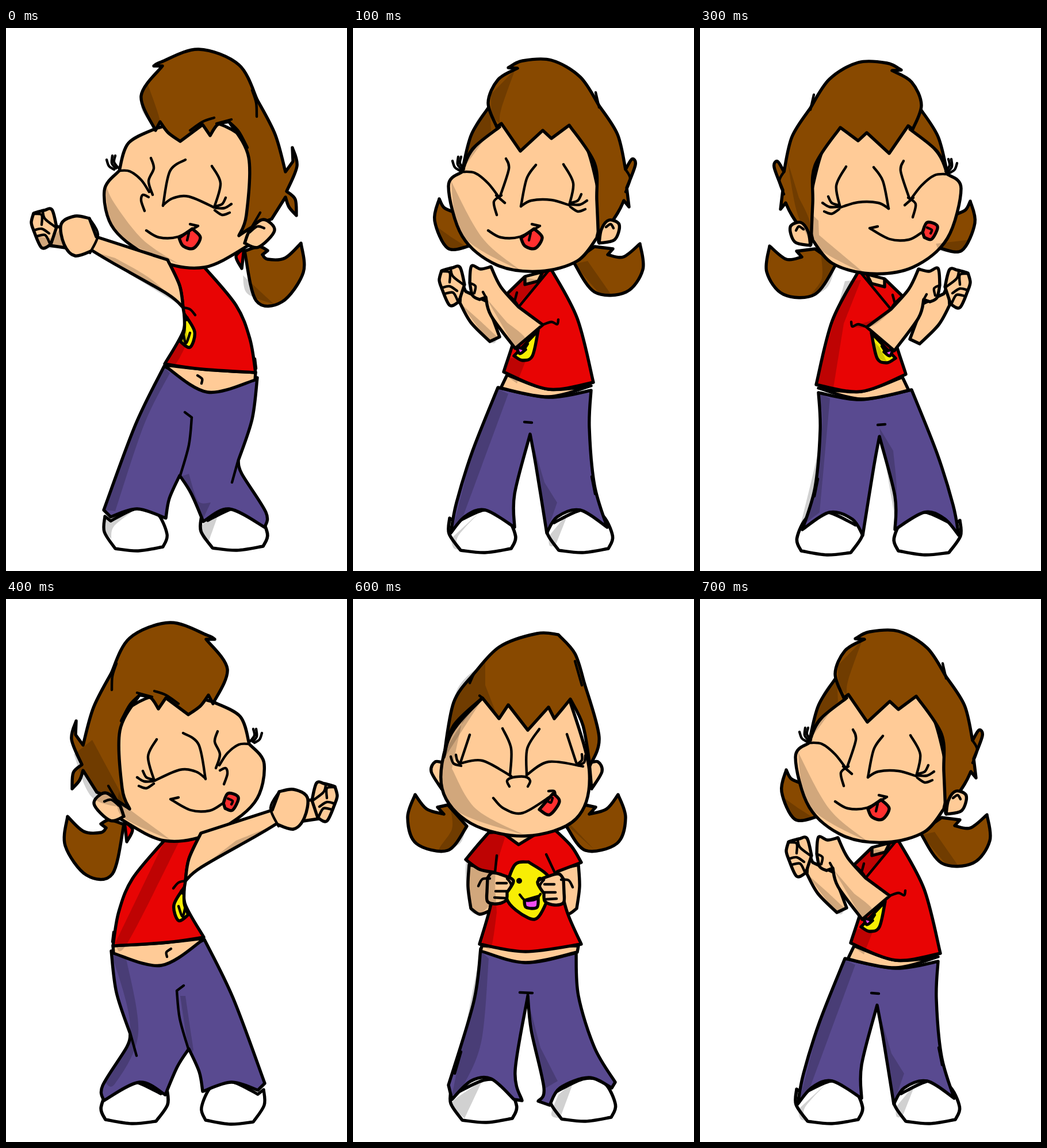
These frames come from a looping animation (593x944 px, 800 ms). An HTML page:

```html
<!DOCTYPE html>
<html lang="en">
<head>
<meta charset="utf-8">
<title>Dancing girl</title>
<style>
html, body { margin: 0; width: 100%; height: 100%; overflow: hidden; background: #fff; }
svg { display: block; width: 100vw; height: 100vh; }
path { stroke: #000; stroke-linecap: round; stroke-linejoin: round; }
</style>
</head>
<body>
<svg id="stage" viewBox="0 0 593 944"></svg>
<script>
const SKIN = '#ffcb97', HAIR = '#884900', RED = '#e80404', PANTS = '#594a90',
      SHOE = '#fff', YELLOW = '#f8ee04', PINK = '#f04ef0', TONGUE = '#ff2f2f';
const BEAT = 100, MIRROR = 620;
const stage = document.getElementById('stage');

function add(parent, tag, attrs) {
  const node = document.createElementNS('http://www.w3.org/2000/svg', tag);
  for (const key in attrs) node.setAttribute(key, attrs[key]);
  return parent.appendChild(node);
}

// Smooth curve through each run of points; a slash marks a sharp corner.
function curve(text) {
  let d = '', last;
  for (const run of text.split('/')) {
    const n = run.trim().split(/\s+/).map(Number);
    const p = last ? [last] : [];
    for (let i = 0; i < n.length; i += 2) p.push([n[i], n[i + 1]]);
    if (!last) d = 'M' + p[0];
    for (let i = 1; i < p.length; i++) {
      const a = p[i - 1], b = p[i], before = p[i - 2] || a, after = p[i + 1] || b;
      const c1 = a.map((v, k) => v + (b[k] - before[k]) / 6);
      const c2 = b.map((v, k) => v - (after[k] - a[k]) / 6);
      d += `C${c1} ${c2} ${b}`;
    }
    last = p[p.length - 1];
  }
  return d;
}

function pen(group) {
  return {
    fill(color, text) {
      add(group, 'path', { d: curve(text) + 'Z', fill: color, 'stroke-width': 5.4 });
    },
    line(...runs) {
      for (const text of runs) add(group, 'path', { d: curve(text), fill: 'none', 'stroke-width': 4.4 });
    },
    dot(x, y) {
      add(group, 'circle', { cx: x, cy: y, r: 5 });
    },
    shade(...runs) {
      for (const text of runs) add(group, 'path', { d: curve(text) + 'Z', 'fill-opacity': 0.18, style: 'stroke:none' });
    },
    at(x, y, sx = 1) {
      return pen(add(group, 'g', { transform: `translate(${x} ${y}) scale(${sx} 1)` }));
    }
  };
}

// Parts shared by several poses
function shoe(p) {
  p.fill(SHOE, '2 14 1 41 20 70 / 60 74 103 67 / 110 45 92 8 58 0 12 22');
}

function fist(p) {
  p.fill(SKIN, '4 36 0 22 4 6 / 22 1 36 0 44 30 / 34 60 / 18 66 4 36');
  p.line('5 7 18 9 18 26', '20 4 24 16 42 30', '4 36 18 33 31 41', '10 46 24 44 32 58');
}

function lashes(p) {
  p.line('2 0 14 -4 20 -15', '3 3 18 3 30 -4', '1 7 14 15 27 11');
}

function farLashes(p) {
  p.line('-3 0 -12 -6 -16 -17', '0 -2 -7 -11 -6 -24', '4 -3 -3 -13 -1 -24');
}

function mouth(p, flipped) {
  p.line('0 0 22 12 55 11 90 -8', '76 -11 89 -8');
  if (flipped) {
    p.fill(TONGUE, '-2 -1 -10 -18 -28 -11 -18 11 -5 8 / -2 -1');
    p.line('-10 -9 -18 -5 -16 1');
  } else {
    p.fill(TONGUE, '80 -3 94 12 82 31 64 27 57 13 / 80 -3');
    p.line('74 4 71 17');
  }
}

function reach(p, flipped) {
  shoe(p.at(170, 835));
  shoe(p.at(338, 834, 1.06));
  p.fill(PANTS, '275 588 225 690 170 838 / 182 850 / 228 836 278 852 / 284 818 302 778 / 322 809 343 858 / 388 836 450 868 / 452 842 410 775 404 752 / 428 680 437 608 / 350 620 275 588');
  p.line('311 668 323 677 / 318 725 303 778', '403 754 393 790');
  p.fill(SKIN, '277 588 350 633 433 612 / 434 599 / 350 594 277 586');
  p.line('333 604 341 610 340 618');
  p.fill(RED, '281 403 302 448 308 486 / 309 525 276 584 / 340 593 434 599 / 424 540 400 482 345 416 / 281 403');
  p.fill(YELLOW, '310 497 328 528 320 555 303 545 / 310 525 310 497');
  p.line('308 530 313 548 320 530', '308 486 320 489 329 499', '433 575 435 592');
  p.dot(313, 505);
  p.fill(RED, '414 383 400 397 410 418');
  p.fill(HAIR, '415 388 440 380 455 387 / 446 394 / 455 402 485 400 513 374 / 517 425 480 476 435 474 415 388');

  p.fill(SKIN, '262 174 213 200 197 248 / 171 283 188 350 260 402 345 416 425 376 / 432 220 350 160 262 174');
  p.fill(HAIR, '257 66 / 270 59 335 37 405 64 437 125 / 468 185 486 250 / 499 232 / 498 208 / 506 240 488 284 / 503 298 505 326 / 492 311 486 294 / 462 332 / 430 345 405 361 / 418 325 422 225 388 163 / 368 168 355 187 / 342 168 / 303 197 / 282 182 268 163 / 260 178 / 235 118 272 66 / 257 66');
  p.fill(SKIN, '415 374 425 350 448 333 467 352 439 381 415 374');
  p.line('424 355 437 345 449 348', '442 321 425 350', '428 108 435 130 436 154', '362 156 342 163 320 178', '388 163 405 180 420 208', '366 166 392 159');
  p.line('197 248 215 249 235 264 249 285', '252 226 257 244 248 266 255 290', '248 294 238 290 235 300 241 318');
  p.line('312 229 285 249 273 309', '273 308 290 296 318 293 362 312', '358 240 373 270 362 312');
  lashes(p.at(362, 310));
  farLashes(p.at(191, 246));
  mouth(p.at(244, 352), flipped);

  p.fill(SKIN, '82 345 98 346 / 103 382 / 76 378');
  fist(p.at(44, 316));
  p.fill(SKIN, '281 403 157 363 / 145 331 / 120 327 96 341 101 376 120 396 150 387 / 185 408 280 462 308 486 / 302 448 281 403');
  p.line('145 331 160 359 146 391');
}

function tuck(p, flipped) {
  shoe(p.at(166, 838, 1.06));
  shoe(p.at(337, 838, 1.04));
  p.fill(PANTS, '252 625 208 735 180 825 170 878 / 195 849 230 838 281 868 / 281 810 308 706 / 318 760 337 878 / 355 850 395 838 442 868 / 420 795 411 695 414 630 / 340 642 252 625');
  p.line('298 685 311 686', '415 780 421 810');
  p.fill(SKIN, '268 603 257 626 / 340 641 414 622 / 340 628 268 603');
  p.fill(RED, '298 433 268 462 / 290 500 262 598 / 340 628 418 616 / 390 505 345 420 / 298 433');
  p.fill(SKIN, '299 432 299 446 / 322 440 / 330 424');
  p.line('340 422 288 485', '285 460 281 475');
  p.fill(YELLOW, '280 570 295 578 312 570 322 526 / 280 570');
  p.fill(PINK, '284 554 290 566 300 559');
  p.line('297 560 304 549');

  p.fill(SKIN, '186 478 205 512 238 545 / 255 537 / 232 475 / 196 458 / 188 440');
  fist(p.at(150, 416));
  p.fill(SKIN, '288 485 257 450 240 415 / 222 419 206 414 203 443 / 208 465 220 472 / 231 468 / 240 500 282 557 / 330 516 / 288 485');
  p.line('231 468 226 459', '205 444 213 449 211 461', '330 516 345 511 355 515 357 507');

  p.fill(HAIR, '150 297 142 335 165 383 205 378 / 175 320 / 158 312 150 297');
  p.fill(HAIR, '420 380 452 384 / 443 394 / 470 398 499 375 / 504 420 475 459 420 459 383 406 / 420 380');
  p.fill(SKIN, '250 165 205 215 190 250 / 166 275 190 362 250 412 325 423 390 405 424 365 / 430 300 380 165 250 165');
  p.fill(HAIR, '238 135 206 185 190 248 / 208 210 255 172');
  p.fill(HAIR, '270 69 / 295 57 345 56 395 85 428 135 / 460 185 474 246 / 485 228 491 238 476 278 / 480 311 / 471 300 / 460 322 427 372 / 424 300 420 235 376 169 / 345 192 / 330 178 / 291 214 / 258 166 / 250 172 / 235 130 252 90 286 70');
  p.fill(SKIN, '428 374 432 350 445 334 463 342 455 368 428 374');
  p.line('440 346 448 341 453 348', '422 112 428 138', '474 246 482 262 474 285');
  p.line('190 250 212 252 235 270 255 296', '266 227 271 245 256 292', '249 291 264 304', '258 291 245 302 250 325');
  p.line('318 238 302 262 292 310', '292 310 310 300 345 299 376 308', '366 237 383 270 376 308');
  lashes(p.at(377, 304));
  farLashes(p.at(189, 248));
  mouth(p.at(235, 352), flipped);
}

function frontSide(p, arm) {
  if (arm) {
    p.fill(SKIN, '202 462 200 500 205 538 / 220 548 238 542 / 248 472');
  } else {
    p.fill(HAIR, '108 340 95 380 110 425 165 437 198 395 / 165 358 / 147 362 / 158 374 / 128 365 108 340');
    p.fill(SKIN, '158 285 143 283 136 300 154 330');
  }
}

function frontFist(p) {
  p.fill(SKIN, '234 485 242 476 260 480 279 490 268 510 / 266 524 250 530 234 526 233 508 / 234 485');
  p.line('250 494 267 494', '248 508 268 508', '246 519 264 520', '218 499 225 487 238 486', '268 486 275 497 268 510');
}

function front(p) {
  shoe(p.at(169, 836, 1.05));
  shoe(p.at(342, 834, 1.04));
  p.fill(PANTS, '222 608 210 700 166 845 / 172 870 / 205 838 240 834 280 870 / 294 872 / 282 820 304 690 / 310 750 332 850 322 873 / 342 880 / 360 850 410 832 450 850 / 456 840 / 420 780 392 690 388 615 / 300 632 222 608');
  p.line('290 684 312 685', '304 686 304 710', '188 787 177 825');
  p.fill(SKIN, '224 603 222 612 / 300 632 390 614 / 392 603');
  frontSide(p, true);
  frontSide(p.at(594, 0, -1), true);
  p.fill(RED, '236 406 215 430 196 453 / 220 470 246 475 / 240 530 220 600 / 300 613 397 600 / 372 543 355 474 / 397 458 / 380 430 352 402 / 236 406');
  p.fill(SKIN, '262 408 / 288 427 / 316 410');
  p.line('250 446 247 475', '336 444 352 478');
  p.fill(YELLOW, '305 457 344 490 326 548 304 554 267 520 280 464 305 457');
  p.dot(289, 490);
  p.dot(325, 488);
  p.fill(PINK, '298 524 301 536 320 536 322 517');
  p.line('290 514 300 524 318 522 326 513');
  frontFist(p);
  frontFist(p.at(600, 2, -1));
  frontSide(p);
  frontSide(p.at(569, 0, -1));

  p.fill(SKIN, '225 172 168 240 155 330 205 390 300 412 388 382 411 300 375 170 / 300 165 225 172');
  p.fill(HAIR, '357 62 / 320 60 255 83 210 130 / 175 180 158 275 / 175 220 225 172 / 254 208 / 270 184 / 304 228 / 340 188 / 350 208 / 365 190 378 174 / 400 220 412 290 / 428 240 402 145 / 386 95 357 62');
  p.line('386 108 398 150', '225 172 220 168', '378 174 381 181', '210 130 203 146');
  p.line('203 236 186 287', '186 286 225 281 275 308', '260 225 275 260 273 307');
  p.line('324 226 303 260 302 306', '302 306 340 283 400 291', '372 235 388 284');
  p.line('188 290 175 286 170 274', '186 287 181 280 179 271', '390 287 398 280 398 270', '392 289 402 284 404 272');
  p.line('272 326 268 316 278 310 299 309 308 316 304 326', '244 346 262 364 295 372 345 342', '340 334 350 334 352 342');
  p.fill(TONGUE, '348 338 359 352 342 375 324 366 / 348 338');
  p.line('337 350 344 354 347 346');
}

// Shadows always fall on the viewer's left.
const shadows = {
  reach(p) {
    p.shade('275 590 225 690 172 838 / 190 840 / 240 690 285 600', '303 780 342 855 / 356 825 / 334 822 318 775');
    p.shade('173 852 172 874 183 888 / 188 866 225 837', '341 864 341 886 352 894 / 372 838');
    p.shade('173 270 192 358 300 410 / 238 368 188 304 173 270', '238 110 236 142 260 176 / 268 162 246 96');
    p.shade('412 430 420 462 466 480 / 412 430', '150 388 306 484 / 250 435 190 400', '310 500 311 530 278 584 / 295 584 316 545');
    p.shade('52 362 62 382 100 378 94 350 / 80 366');
  },
  tuck(p) {
    p.shade('253 628 215 715 173 872 / 193 845 / 270 636', '309 710 338 874 / 355 825 / 333 790');
    p.shade('170 888 175 904 186 907 / 182 885 220 842', '340 884 342 900 352 900 / 375 842');
    p.shade('170 265 192 362 295 424 / 225 365 170 265', '240 115 242 150 255 166 / 258 140 282 72', '238 135 212 168 192 244 / 240 178');
    p.shade('145 345 165 382 200 382 / 170 363', '385 410 430 462 448 462 / 408 405', '186 478 238 545 252 538 / 222 510');
    p.shade('232 470 282 556 / 300 540 268 512', '297 434 270 462 286 482 / 325 438', '270 574 263 598 285 618 / 302 574');
  },
  front(p) {
    p.shade('222 612 172 864 / 195 840 224 765 236 625', '305 700 332 852 / 356 838 / 326 780');
    p.shade('182 866 172 880 194 903 / 225 837', '357 862 345 896 360 903 / 384 838');
    p.shade('230 110 180 160 160 275 / 225 174 / 252 206 / 230 150', '222 174 160 270 172 362 300 411 / 214 365 172 295 / 190 212');
    p.shade('170 366 172 400 150 436 185 426 197 396', '374 395 420 436 / 378 392', '354 403 392 442 / 368 420');
    p.shade('238 408 198 452 202 535 220 547 240 536 224 600 / 240 606 250 545 / 248 476 265 412');
  },
  tuckRight(p) {
    p.shade('204 634 212 700 174 868 / 208 842 / 226 644', '312 695 340 858 / 342 800 336 735');
    p.shade('152 230 168 318 193 374 / 190 334 172 295', '196 325 200 378 288 428 / 207 360 / 206 335');
    p.shade('210 390 212 435 192 466 222 450 236 412', '252 440 203 618 / 232 626 / 250 514 / 280 438');
    p.shade('262 520 300 518 338 487 / 300 508', '410 375 420 388 455 386 470 368', '300 542 304 570 325 580 / 312 555');
  },
  reachRight(p) {
    p.shade('185 620 216 750 172 840 / 190 842 230 755 208 620', '303 690 318 784 326 784 / 312 690');
    p.shade('196 335 202 378 288 420 / 207 360', '118 270 150 345 214 364 / 150 245');
    p.shade('275 422 190 598 / 210 600 300 424', '312 488 400 432 470 392 / 400 420');
  }
};

const drawers = { reach, tuck, front };
const beats = ['reach', 'tuck', 'front', 'tuckRight', 'reachRight', 'tuckRight', 'front', 'tuck'];
const poses = {};

for (const name of new Set(beats)) {
  const base = name.replace('Right', ''), flipped = name !== base;
  const group = poses[name] = add(stage, 'g', {});
  const p = pen(group);
  drawers[base](flipped ? p.at(MIRROR, 4, -1) : p, flipped);
  shadows[name](p);
}

function draw(time) {
  const now = beats[Math.floor(time / BEAT) % beats.length];
  for (const name in poses) poses[name].style.display = name === now ? '' : 'none';
}

let start;
function tick(time) {
  start ??= time;
  draw(time - start);
  requestAnimationFrame(tick);
}
draw(0);
requestAnimationFrame(tick);
</script>
</body>
</html>
```
